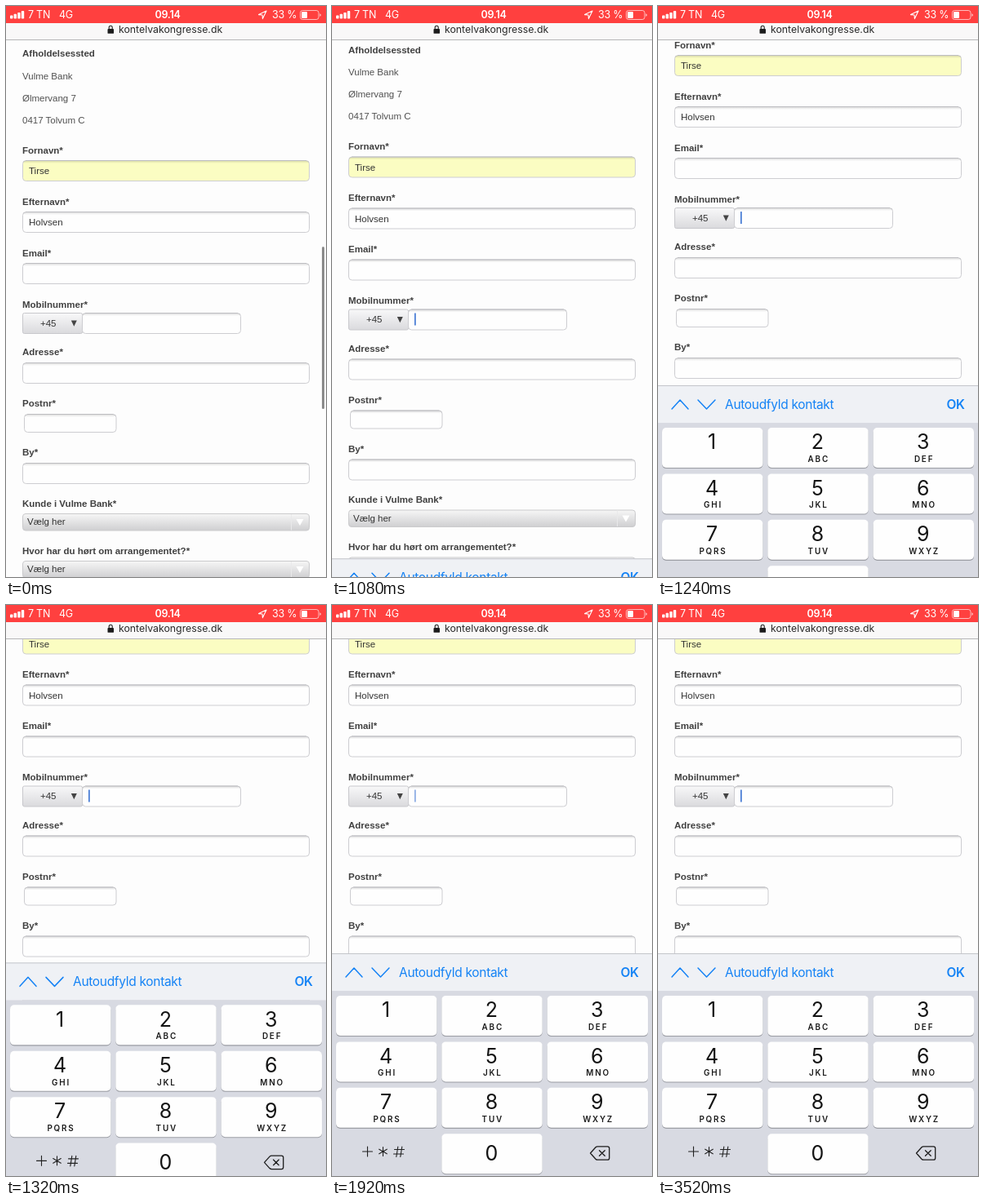
Write an HTML page that moves like this. It is 392x700 px and loops after 3.68 s.

```html
<!DOCTYPE html>
<html lang="da">
<head>
<meta charset="utf-8">
<title>Tilmelding</title>
<style>
  html, body { margin: 0; width: 100%; height: 100%; overflow: hidden; background: #fdfdfd; }
  svg { display: block; width: 392px; height: 700px; }
  text { white-space: pre; }
  .form { font: 11.5px "Liberation Sans", Arial, sans-serif; fill: #505050; }
  .form .label { font-weight: bold; fill: #404040; }
  .form .value { fill: #333; }
  .ui { font-family: Inter, Roboto, sans-serif; }
  .status { font-size: 12.5px; fill: #fff; letter-spacing: -.02em; }
  .tool { font-size: 15.5px; fill: #1583f5; letter-spacing: -.02em; }
  .digit { font-size: 25px; fill: #141414; text-anchor: middle; }
  .letters { font-size: 9.9px; font-weight: 600; fill: #1a1a1a; letter-spacing: 1.8px; text-anchor: middle; }
  .line { fill: none; stroke-linecap: round; stroke-linejoin: round; }
</style>
</head>
<body>
<svg viewBox="0 0 392 700">
  <defs>
    <linearGradient id="button" x2="0" y2="1">
      <stop offset="0" stop-color="#f8f8f9"/><stop offset="1" stop-color="#dadadd"/>
    </linearGradient>
    <linearGradient id="select" x2="0" y2="1">
      <stop offset="0" stop-color="#f6f6f6"/><stop offset="1" stop-color="#cfcfd1"/>
    </linearGradient>
    <linearGradient id="inset" x2="0" y2="1">
      <stop offset="0" stop-color="#000" stop-opacity=".12"/><stop offset="1" stop-color="#000" stop-opacity="0"/>
    </linearGradient>
  </defs>

  <rect width="392" height="700" fill="#fdfdfd"/>
  <g id="page" class="form"></g>
  <rect id="scrollbar" x="387" y="295" width="3" height="199" rx="1.5" fill="#8c8c8c"/>

  <g id="keyboard" class="ui">
    <rect y="427" width="392" height="46" fill="#eff1f5"/>
    <rect y="427" width="392" height="1" fill="#c3c5ca"/>
    <rect y="473" width="392" height="230" fill="#d8dae2"/>
    <path class="line" d="M17 456 27 445 37 456M49 445 59.5 456 70 445" stroke="#1583f5" stroke-width="1.5"/>
    <text class="tool" x="82" y="456">Autoudfyld kontakt</text>
    <text class="tool" x="353.5" y="456" font-weight="600">OK</text>
    <g id="keys"></g>
    <path class="line" stroke="#222" stroke-width="1.1" d="M37.5 670H49.5M43.5 664V676
      M62.5 664.5V675.5M57.7 667.2 67.3 672.8M57.7 672.8 67.3 667.2
      M76.5 667.5H88.5M75.5 673H87.5M80.8 664 78.8 676.5M85.8 664 83.8 676.5"/>
    <path class="line" stroke="#1c1c1c" stroke-width="1.3" d="M316.5 672 323 664.8Q324 663.8 325.3 663.8H337.5Q339.7 663.8 339.7 666V678
      Q339.7 680.2 337.5 680.2H325.3Q324 680.2 323 679.2ZM327.5 668.7 334.2 675.3M334.2 668.7 327.5 675.3"/>
  </g>

  <g class="ui">
    <rect width="392" height="42" fill="#f9f8f8"/>
    <rect y="41" width="392" height="1" fill="#b5b5b7"/>
    <rect width="392" height="21" fill="#ff403f"/>
    <g id="bars" fill="#fff"></g>
    <g class="status">
      <text x="27" y="15.3">7 TN</text>
      <text x="65" y="15.3">4G</text>
      <text x="198" y="15.3" font-weight="600" text-anchor="middle">09.14</text>
      <text x="326" y="15.3">33 %</text>
    </g>
    <path class="line" d="M319 6 309.5 10.6 314 11 314.4 15.6Z" stroke="#fff" stroke-width="1.1"/>
    <rect x="360.5" y="5.5" width="22.5" height="11" rx="2.8" fill="none" stroke="#fff" stroke-opacity=".65"/>
    <rect x="362" y="7" width="7" height="8" rx="1.3" fill="#fff"/>
    <path d="M384.3 9.2Q386 9.6 386 11T384.3 12.8Z" fill="#fff" fill-opacity=".65"/>
    <rect x="124.5" y="28" width="7.5" height="5.8" rx=".9" fill="#1c1c1c"/>
    <path class="line" d="M126.2 28V26.3Q126.2 24.3 128.2 24.3T130.2 26.3V28" stroke="#1c1c1c" stroke-width="1.1"/>
    <text x="138" y="32.7" font-size="12.3" fill="#2a2a2a">kontelvakongresse.dk</text>
  </g>
</svg>
<script>
const NS = 'http://www.w3.org/2000/svg';
const LOOP = 3680, SCROLL = 154.5, KEYBOARD = 273, FOCUS = 1054.5;
const byId = id => document.getElementById(id);
const page = byId('page'), keys = byId('keys'), keyboard = byId('keyboard'), scrollbar = byId('scrollbar');

function add(parent, tag, attrs, content) {
  const el = document.createElementNS(NS, tag);
  for (const k in attrs) el.setAttribute(k, attrs[k]);
  if (content) el.textContent = content;
  parent.appendChild(el);
  return el;
}
const rect = (parent, x, y, width, height, fill, more) =>
  add(parent, 'rect', { x, y, width, height, fill, ...more });
const write = (parent, x, y, content, name = '') => add(parent, 'text', { x, y, class: name }, content);
const label = (y, content) => write(page, 20, y, content, 'label');

function field(y, x = 20, w = 352, h = 26, fill = '#fefefe') {
  rect(page, x + .5, y + .5, w - 1, h - 1, fill, { rx: 4, stroke: '#cdcdd1' });
  rect(page, x + 1, y + 1, w - 2, 3, 'url(#inset)', { rx: 2 });
  add(page, 'path', { d: `M${x + 4} ${y + .5}h${w - 8}`, stroke: '#bdbdc1' });
}

function select(y) {
  rect(page, 20.5, y + .5, 351, 20.5, 'url(#select)', { rx: 3.5, stroke: '#cacacc' });
  add(page, 'path', { d: `M349.5 ${y + 1}v19.5`, stroke: '#e9e9ea' });
  add(page, 'path', { d: `M355.5 ${y + 7}h9l-4.5 8z`, fill: '#fff' });
  write(page, 26, y + 14, 'Vælg her', 'value');
}

function buildPage() {
  label(62, 'Afholdelsessted');
  ['Vulme Bank', 'Ølmervang 7', '0417 Tolvum C'].forEach((s, i) => write(page, 20, 89.5 + i * 27.2, s));

  label(180.5, 'Fornavn*');
  field(189, 20, 352, 26, '#fbfdc2');
  write(page, 28, 206, 'Tirse', 'value');
  label(243.5, 'Efternavn*');
  field(252);
  write(page, 28, 269, 'Holvsen', 'value');
  label(306.5, 'Email*');
  field(315);

  label(369.5, 'Mobilnummer*');
  rect(page, 20.5, 376.5, 73, 25, 'url(#button)', { rx: 2, stroke: '#c8c8cc' });
  write(page, 42, 392.5, '+45', 'value');
  add(page, 'path', { d: 'M79.8 385.5h7l-3.5 7.2z', fill: '#444' });
  field(376, 93, 195);

  label(428, 'Adresse*');
  field(437);
  label(491, 'Postnr*');
  field(500, 22, 113.5, 23);
  label(551, 'By*');
  field(560);
  label(613.5, 'Kunde i Vulme Bank*');
  select(622);
  label(671.5, 'Hvor har du hørt om arrangementet?*');
  select(680);
}

function buildKey(col, row, digit, letters) {
  const x = 5 + col * 129.3, y = 479 + row * 56.4, mid = x + 61.7;
  rect(keys, x, y + 1.1, 123.4, 49, '#9a9ca3', { rx: 5 });
  rect(keys, x, y, 123.4, 49, '#fefefe', { rx: 5 });
  write(keys, mid - .6, y + (row < 3 ? 26.3 : 32.8), digit, 'digit');
  if (letters) write(keys, mid + .8, y + 42, letters, 'letters');
}

buildPage();
const caret = rect(page, 101, 381, 1.7, 15, '#4479d4');
['', 'ABC', 'DEF', 'GHI', 'JKL', 'MNO', 'PQRS', 'TUV', 'WXYZ'].forEach((s, i) =>
  buildKey(i % 3, Math.floor(i / 3), String(i + 1), s));
buildKey(1, 3, '0');
for (let i = 0; i < 4; i++) {
  const h = 4 + i * 1.8;
  rect(byId('bars'), 5 + i * 4.6, 15.5 - h, 3.4, h, '#fff', { rx: .8 });
}

const ramp = (t, from, to) => Math.min(1, Math.max(0, (t - from) / (to - from)));
const ease = x => x * x * (3 - 2 * x);

// critically damped spring: share of the way still left
function springLeft(t) {
  const s = Math.max(0, t - FOCUS) * .0187;
  return t > 1680 ? 0 : (1 + s) * Math.exp(-s);
}

function caretAlpha(t) {
  if (t < FOCUS) return 0;
  if (t < 1800) return 1;
  const u = (t - 1800) % 1000;
  return 1 - ramp(u, 0, 320) + ramp(u, 480, 720);
}

function draw(t) {
  const scroll = SCROLL * ease(ramp(t, FOCUS, FOCUS + 250));
  page.setAttribute('transform', `translate(0 ${-scroll})`);
  keyboard.setAttribute('transform', `translate(0 ${KEYBOARD * springLeft(t)})`);
  scrollbar.setAttribute('opacity', 1 - ramp(t, 680, 920));
  caret.setAttribute('opacity', caretAlpha(t));
}

let start;
function tick(now) {
  if (start === undefined) start = now;
  draw((now - start) % LOOP);
  requestAnimationFrame(tick);
}
draw(0);
requestAnimationFrame(tick);
</script>
</body>
</html>
```
